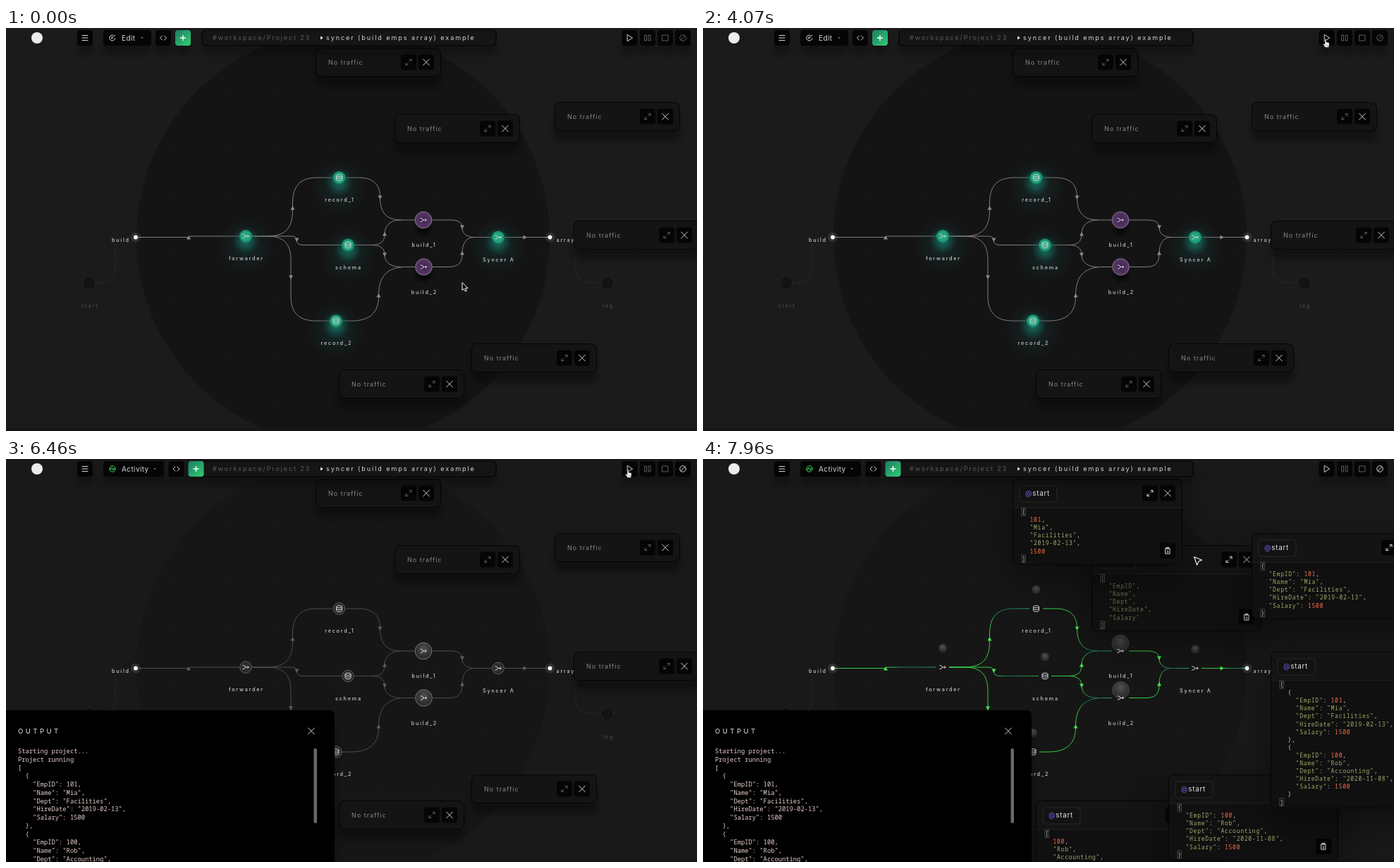
These frames come from a looping animation (980x571 px, 8 s). An HTML page:

```html
<!DOCTYPE html>
<html lang="en">
<head>
<meta charset="utf-8">
<title>Flow editor run</title>
<style>
html, body { margin: 0; width: 100%; height: 100%; overflow: hidden; background: #1b1b1b; }
svg { display: block; width: 980px; height: 571px; font-family: Inter, "Open Sans", sans-serif; }
text { white-space: pre; }
.ico { fill: none; stroke: #d4d4d4; stroke-width: 1; stroke-linecap: round; stroke-linejoin: round; }
.dim { stroke: #5c5c5c; }
.label { font-size: 7.2px; letter-spacing: 1.8px; font-weight: 500; fill: #cfc9c9; }
.faint { fill: #4a4a4a; }
.code { font-family: "Noto Sans Mono", "DejaVu Sans Mono", monospace; font-size: 8px; letter-spacing: .75px; fill: #c8c8c8; }
.log { font-family: "Noto Sans Mono", "DejaVu Sans Mono", monospace; font-size: 8.8px; fill: #e6cfca; }
.str { fill: #a3aa6c; }
.num { fill: #f2704f; }
.wire { fill: none; stroke: #857d7d; stroke-width: 1; }
.tip { fill: #8f8888; }
.dash { fill: none; stroke: #353535; stroke-dasharray: 2 2.5; }
.active .wire { stroke: #4d4d4d; }
.active .tip { fill: #5e5e5e; }
.live .wire { stroke: var(--flow); }
.live .tip { fill: #41e44f; }
.panel, .output { filter: drop-shadow(0 14px 5px rgba(0, 0, 0, .34)); }
.live .panel { filter: drop-shadow(0 18px 24px rgba(0, 0, 0, .4)); }
.bar { filter: drop-shadow(0 13px 5px rgba(0, 0, 0, .25)); }
</style>
</head>
<body>
<svg id="stage" viewBox="0 0 980 571" xmlns="http://www.w3.org/2000/svg"></svg>
<script>
const stage = document.getElementById('stage');
const LOOP = 8000;
const GREEN = '#38cb49', TEAL = '#1d6c5f';

const path = (d, cls = 'ico') => `<path class="${cls}" d="${d}"/>`;
const at = (x, y, body, attrs = '') => `<g transform="translate(${x} ${y})" ${attrs}>${body}</g>`;
const text = (x, y, body, attrs) => `<text x="${x}" y="${y}" ${attrs}>${body}</text>`;
const rect = (x, y, w, h, r, attrs) => `<rect x="${x}" y="${y}" width="${w}" height="${h}" rx="${r}" ${attrs}/>`;
const only = (when, body) => `<g data-when="${when}">${body}</g>`;

const ICON = {
  menu: 'M-4-3.5H4M-4 0H4M-4 3.5H4',
  code: 'M-1.5-3L-4.5 0L-1.5 3M1.5-3L4.5 0L1.5 3',
  plus: 'M-4 0H4M0-4V4',
  close: 'M-4.4-4.4L4.4 4.4M4.4-4.4L-4.4 4.4',
  grow: 'M1-4H4V-1M4-4L1-1M-1 4H-4V1M-4 4L-1 1',
  play: 'M-3-4.5L4 0L-3 4.5Z',
  pause: 'M-4-4H-1.5V4H-4ZM1.5-4H4V4H1.5Z',
  stop: 'M-4-4H4V4H-4Z',
  ban: 'M4.3 0A4.3 4.3 0 1 1-4.3 0A4.3 4.3 0 1 1 4.3 0M-3 3L3-3',
  redo: 'M3.8 1A4 4 0 1 1 1-3.2H4M2-5.5L4.4-3.2L2-1',
  clip: 'M-3-3H3V4.5H-3ZM-1.5-4.5H1.5V-2.5H-1.5ZM-1 .5H1M-1 2.5H1',
  join: 'M-4.2-2.5H-3.2Q-1.2-2.5-.5 0Q-1.2 2.5-3.2 2.5H-4.2M-.5 0H4.2M2.6-1.5L4.2 0L2.6 1.5',
  data: 'M-4-2.7A4 1.6 0 0 1 4-2.7A4 1.6 0 0 1-4-2.7V2.7A4 1.6 0 0 0 4 2.7V-2.7M-4 0A4 1.6 0 0 0 4 0',
  pen: 'M1-3.8A4 4 0 1 0 3.8 .8M-1 1L3.5-4M-1 1V-1.5',
  pulse: 'M4.2 0A4.2 4.2 0 1 1-4.2 0A4.2 4.2 0 1 1 4.2 0M-4 .5H-2L-.8-2L1 2L2-.3H4'
};
const button = (x, y, icon, cls = '') =>
  rect(x - 11, y - 11, 22, 22, 4, 'fill="#050505"') + at(x, y, path(ICON[icon], 'ico ' + cls));

// Backdrop
function backdrop() {
  let s = '<rect id="back" width="980" height="571"/><circle id="disc" cx="478" cy="297" r="293"/>';
  for (let y = 20; y < 571; y += 73.5)
    for (let x = 17; x < 980; x += 73.5) s += `<circle cx="${x}" cy="${y}" r=".7" fill="#303030"/>`;
  return s + '<rect y="567" width="980" height="4" fill="#161616"/>';
}

// Wires: [x1, x2, path, arrow x, arrow y, arrow angle]
const wires = [
  [184, 340, 'M184 296.5H259Q259 295 262 295H331', 259, 297, -90],
  [349, 463, 'M349 295H370C396 295 406.5 284 406.5 258V248C406.5 224 417 212 441 212H463', 406.5, 255, -90],
  [349, 476, 'M349 295H404Q412 295 412 300Q412 307.5 421 307.5H476', 412.5, 300, 90],
  [349, 459, 'M349 295H370C395 295 404 306 404 330V380C404 404 416 415 440 415H459', 404, 353, 90],
  [482, 580, 'M482 212H500C520 212 530.5 221 530.5 240C530.5 262 540 272 560 272H580', 530.5, 240, 90],
  [494, 580, 'M494 307.5H518C531 307.5 537 303 537 292C537 280 545 272 560 272', 537, 292, -90],
  [494, 580, 'M494 307.5H518C531 307.5 537 312 537 321C537 332 545 338.5 560 338.5', 537, 321, 90],
  [477, 580, 'M477 415H490C515 415 528.5 404 528.5 380C528.5 354 538 338.5 568 338.5H580', 528.5, 379, -90],
  [604, 690, 'M604 272H630C642 272 647 276 647 283C647 291 653 296.5 665 296.5H689', 647, 282, 90],
  [604, 690, 'M604 338.5H628C641 338.5 647 333 647 320C647 304 653 296.5 665 296.5', 647, 319, -90],
  [707, 771, 'M707 296.5H771', 736, 296.5, 0]
];
function drawWires() {
  return wires.map(([x1, x2, d, ax, ay, turn], i) =>
    `<linearGradient id="flow${i}" gradientUnits="userSpaceOnUse" x1="${x1}" x2="${x2}" y1="0" y2="0">
      <stop offset="0" stop-color="${GREEN}"/><stop offset=".5" stop-color="${GREEN}"/>
      <stop offset=".68" stop-color="${TEAL}"/><stop offset="1" stop-color="#2ca54b"/></linearGradient>
    <g style="--flow:url(#flow${i})">${path(d, 'wire')}</g>
    <path class="tip" transform="translate(${ax} ${ay}) rotate(${turn})" d="M-2.5-3L3 0L-2.5 3Z"/>`).join('');
}

// Nodes: [label, x, y, icon, is big, label dy]
const nodes = [
  ['forwarder', 340, 295, 'join', false, 34],
  ['record_1', 472.5, 212, 'data', false, 34],
  ['schema', 485, 307.5, 'data', false, 34],
  ['record_2', 468, 415, 'data', false, 34],
  ['Syncer A', 698, 296.5, 'join', false, 34],
  ['build_1', 592, 272, 'join', true, 38],
  ['build_2', 592.5, 338.5, 'join', true, 38]
];
function drawNode([label, x, y, icon, big, dy]) {
  const glow = big ? '<ellipse cy="12" rx="16" ry="13" fill="url(#soot)"/>'
    : '<circle cy="14" r="38" fill="url(#haze)"/><circle cy="6" r="20" fill="url(#glow)"/>';
  const edit = big ? '<circle r="11.8" fill="url(#plum)" stroke="#857d8b" stroke-width=".9"/>'
    : '<circle r="9" fill="#1b946f"/><circle r="6.8" fill="#22a57d"/>';
  const ball = big ? '<circle r="11.8" fill="url(#steel)" stroke="#757575"/>'
    : '<circle r="8.3" fill="#2b2b2b" stroke="#5c5c5c"/>';
  const lifted = big ? at(0, -11, '<circle r="12" fill="url(#steel)" stroke="#4c4c4c" stroke-width=".8"/>')
    : at(0, -27, '<circle r="6" fill="url(#steel)"/>');
  return at(x, y, only('edit', glow + edit) + only('run', ball) + only('live', lifted) +
    path(ICON[icon]) + text(.9, dy, label, 'class="label" text-anchor="middle"'));
}
function graph() {
  const port = x => `<circle cx="${x}" cy="296.5" r="7" fill="#fff" opacity=".1"/><circle cx="${x}" cy="296.5" r="2.9" fill="#fff"/>`;
  const ghost = (x, name) => `<circle class="dash" style="fill:#131313" cx="${x}" cy="361" r="9"/>` +
    text(x + 1, 395.5, name, 'class="label faint" text-anchor="middle"');
  return path('M127 361H132C148 361 155 354 155 340V306', 'dash') +
    path('M844 361H832C816 361 808 354 808 340V306', 'dash') +
    ghost(118, 'start') + ghost(853, 'log') + drawWires() + port(184) + port(771.5) +
    text(150, 303, 'build', 'class="label"') + text(780.5, 303, 'array', 'class="label"') +
    nodes.map(drawNode).join('');
}

// Data shown in the panels and the log
const people = [
  { EmpID: 101, Name: 'Mia', Dept: 'Facilities', HireDate: '2019-02-13', Salary: 1500 },
  { EmpID: 100, Name: 'Rob', Dept: 'Accounting', HireDate: '2020-11-08', Salary: 1500 }
];
const lines = value => JSON.stringify(value, null, 2).split('\n');
const tint = line => line.replace(/"[^"]*"|\d+/g, m =>
  `<tspan class="${m[0] === '"' ? 'str' : 'num'}">${m}</tspan>`);

const panels = [
  [551, 122, Object.keys(people[0]), .62],
  [439, 28, Object.values(people[0]), 1],
  [778, 105, people[0], 1],
  [472, 484, Object.values(people[1]), 1],
  [660, 447, people[1], 1],
  [805, 273, people, 1]
];
function drawPanel([x, y, value, alpha]) {
  const rows = lines(value), step = 11.1, h = 44 + rows.length * step;
  const frame = (w, tall) => rect(.5, .5, w - 1, tall - 1, 7, 'fill="#141414" stroke="#040404"');
  const idle = frame(178, 41) + text(18, 23.7, 'No traffic', 'font-size="9" letter-spacing="1" fill="#858585"') +
    button(132, 20.5, 'grow', 'dim') + button(157, 20.5, 'close');
  const code = rows.map((row, i) => text(13.4, 50 + i * step, tint(row), 'class="code"')).join('');
  const mark = row => rect(13, 41.3 + row * step, 5.6, 11, 0, 'fill="none" stroke="#666" stroke-width=".6"');
  const open = frame(241, h) + `<path d="M1 41H240V${h - 8}Q240 ${h - 1} 233 ${h - 1}H8Q1 ${h - 1} 1 ${h - 8}Z" fill="#101010"/>` +
    '<path d="M0 41H241" stroke="#242424" stroke-width=".8"/>' +
    rect(10, 10, 53, 23, 4, 'fill="#121212" stroke="#292929"') +
    text(18, 24, '<tspan fill="#7d5cf5">@</tspan>start', 'font-size="9.8" letter-spacing=".75" fill="#e4e4e4"') +
    button(195, 20.5, 'grow') + button(220, 20.5, 'close') + button(220, h - 20, 'clip') +
    `<g opacity="${alpha}">${code}</g>` + only('marks', mark(0) + mark(rows.length - 1));
  return at(x, y, only('idle', idle) + only('live', open), 'class="panel"');
}

function topBar() {
  const mode = (w, name, icon, tone) => rect(138, 3, w, 22, 4, 'fill="#050505"') +
    at(151, 14, `<path class="ico" style="stroke:${tone}" d="${ICON[icon]}"/>`) +
    text(164, 17.6, name, 'font-size="10" letter-spacing=".4" fill="#d8d8d8"') +
    `<path d="M${w + 123} 13h4l-2 2.5z" fill="#666"/>`;
  const tools = x => button(x, 14, 'code') + rect(x + 17, 3, 22, 22, 4, 'fill="url(#add)"') +
    at(x + 28, 14, `<path d="${ICON.plus}" stroke="#fff" stroke-width="1.4"/>`);
  const crumb = rect(278, 3, 417, 22, 5, 'fill="#151515" stroke="#030303" stroke-width="1.2"') +
    text(293, 17.2, '#workspace/Project 23', 'font-size="9" letter-spacing="1.9" fill="#5b5b5b"') +
    '<path d="M446 11.5L450 14L446 16.5Z" fill="#ddd"/>' +
    text(454, 17.2, 'syncer (build emps array) example', 'font-size="9" letter-spacing="1.95" fill="#d8d4d4"');
  const first = only('edit stopped', button(884.5, 14, 'play')) + only('started', button(884.5, 14, 'redo'));
  return '<circle cx="44" cy="14" r="8" fill="#ececec"/><g class="bar">' + crumb + button(112, 14, 'menu') +
    only('edit', mode(68, 'Edit', 'pen', '#ddd') + tools(223)) +
    only('active', mode(86, 'Activity', 'pulse', '#3fd65c') + tools(241.5)) +
    first + button(910, 14, 'pause', 'dim') +
    only('edit stopped', button(935, 14, 'stop', 'dim')) + only('started', button(935, 14, 'stop')) +
    only('edit', button(960, 14, 'ban', 'dim')) + only('active', button(960, 14, 'ban')) + '</g>';
}

function output() {
  const row = (s, i) => text(17, 417 + i * 11.77, s, 'class="log"');
  const head = ['Starting project...', 'Project running'];
  return only('active', '<path class="output" d="M0 356H458Q466 356 466 364V571H0Z" fill="#000"/>' +
    text(17, 389.3, 'OUTPUT', 'font-size="9.5" letter-spacing="3.5" fill="#e4e4e4"') +
    at(433, 385.5, path(ICON.close)) + head.map(row).join('') +
    only('stopped', lines(people).slice(0, 12).map((s, i) => row(s, i + 2)).join('') +
      rect(436.5, 410, 4.5, 106, 2, 'fill="#6c6666"')));
}

const pointers = {
  arrow: '<path d="M.5.5V11.6L3.1 9.3L4.9 13.2L6.8 12.3L5.1 8.6H8.5Z" fill="#050505" stroke="#fff" stroke-width="1"/>',
  wide: '<path d="M.7.7L11.5 5.2L6.8 7.1L4.6 12.2Z" fill="#050505" stroke="#fff" stroke-width="1.1" stroke-linejoin="round"/>',
  hand: '<path d="M3 1Q4.5 0 4.9 1.6V5L8 5.6Q9.4 6 9.2 7.6L8.4 12.5H3.7L.6 8.6Q.2 7.3 1.5 7.3L3 8.3Z" fill="#fff" stroke="#111" stroke-width=".6"/><path d="M4.8 8.5V11M6.6 8.5V11" stroke="#555" stroke-width=".6"/>'
};

const stop = (o, c, a = 1) => `<stop offset="${o}" stop-color="${c}" stop-opacity="${a}"/>`;
stage.innerHTML = `<defs>
  <radialGradient id="glow">${stop(0, '#1a8a76', .75)}${stop(.5, '#17756a', .45)}${stop(1, '#14544e', 0)}</radialGradient>
  <radialGradient id="haze">${stop(0, '#14544e', .34)}${stop(.5, '#124844', .2)}${stop(1, '#0e3a38', .05)}</radialGradient>
  <radialGradient id="soot">${stop(0, '#000', .8)}${stop(1, '#000', 0)}</radialGradient>
  <radialGradient id="plum">${stop(0, '#3d2150')}${stop(1, '#5a3a69')}</radialGradient>
  <radialGradient id="steel" cx=".5" cy=".35">${stop(0, '#505050')}${stop(1, '#2e2e2e')}</radialGradient>
  <linearGradient id="add" x2="1" y2="1">${stop(0, '#1f7a64')}${stop(1, '#30cf74')}</linearGradient>
</defs>` + backdrop() + graph() + panels.map(drawPanel).join('') + topBar() + output() +
  Object.entries(pointers).map(([k, d]) => `<g id="${k}">${d}</g>`).join('');

const parts = [...stage.querySelectorAll('[data-when]')].map(el => [el, el.dataset.when.split(' ')]);
const back = document.getElementById('back'), disc = document.getElementById('disc');

// Pointer steps: [time, shape, x, y]
const moves = [
  [0, 'arrow', 646.5, 360], [500, 'arrow', 646, 360], [650, 'arrow', 642, 360], [800, 'arrow', 626, 317],
  [950, 'arrow', 814, 123], [1240, 'arrow', 850, 62], [1390, 'arrow', 855, 43], [1540, 'arrow', 882, 26],
  [1680, 'arrow', 883, 19], [1830, 'arrow', 884, 14], [4070, 'hand', 879, 15], [4220, 'hand', 878, 15.3],
  [4370, 'hand', 877.5, 15], [4510, 'hand', 878, 14], [7360, 'wide', 822, 38.5], [7510, 'wide', 792, 64.5],
  [7810, 'wide', 733, 108], [7960, 'wide', 696, 138]
];

function render(t) {
  const active = t >= 5710, stopped = t >= 6460, live = t >= 7810;
  const on = {
    edit: !active, active, started: active && !stopped, stopped,
    run: active && !live, live, idle: !live, marks: t >= 7960
  };
  for (const [el, when] of parts) el.style.display = when.some(k => on[k]) ? '' : 'none';
  stage.setAttribute('class', live ? 'active live' : active ? 'active' : 'edit');
  back.setAttribute('fill', active ? '#191919' : '#1b1b1b');
  disc.setAttribute('fill', active ? '#161616' : '#141414');
  const [, shape, x, y] = moves.filter(m => m[0] <= t).pop();
  for (const k in pointers) {
    const el = document.getElementById(k);
    el.style.display = k === shape ? '' : 'none';
    el.setAttribute('transform', `translate(${x} ${y})`);
  }
}

const begin = performance.now();
function tick() {
  render((performance.now() - begin) % LOOP);
  requestAnimationFrame(tick);
}
render(0);
requestAnimationFrame(tick);
</script>
</body>
</html>
```
